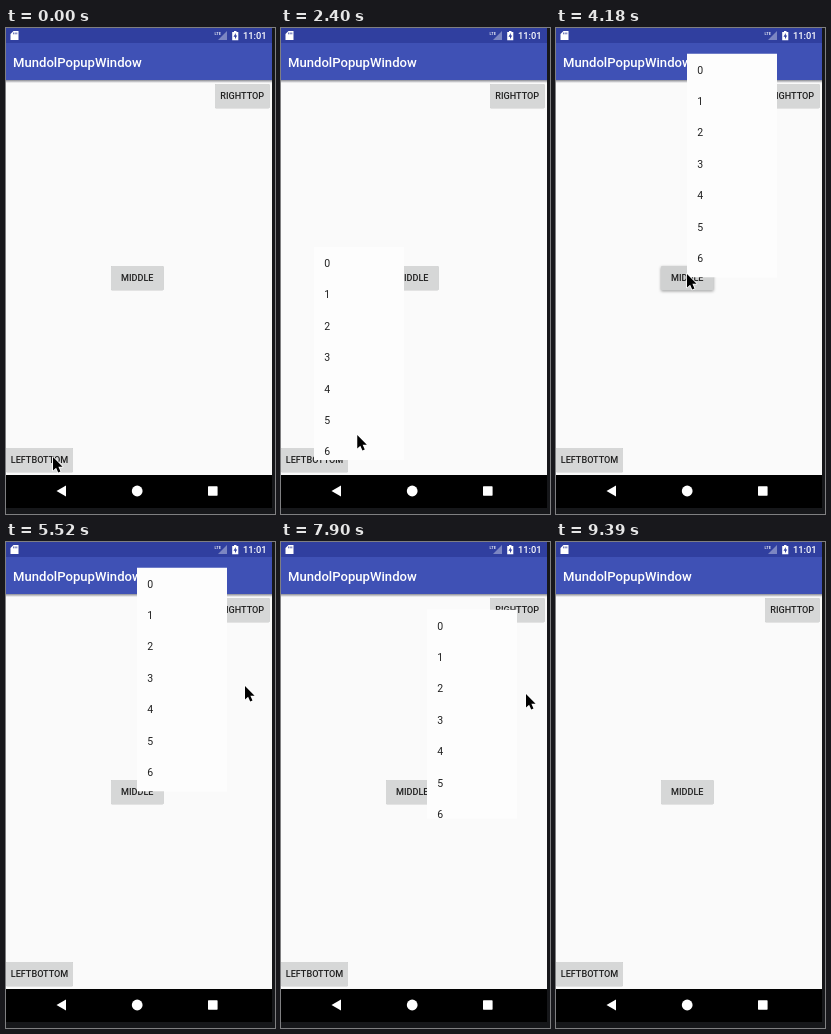
Animation of 269x486 px, one loop 9840 ms. Source, as an HTML page:

```html
<!DOCTYPE html>
<html lang="en">
<head>
<meta charset="utf-8">
<title>Popup window demo</title>
<style>
  html, body { margin: 0; width: 100%; height: 100%; overflow: hidden; background: #16171a; }
  svg { display: block; font-family: Roboto, "Noto Sans", sans-serif; }
  .button { font-size: 9.1px; font-weight: 500; text-anchor: middle; }
  .popup { font-size: 10.5px; text-anchor: middle; }
  text { fill: #212121; }
  .bar { fill: #fff; font-weight: 500; }
</style>
</head>
<body>
<svg id="stage" width="269" height="486" viewBox="0 0 269 486">
  <defs>
    <linearGradient id="fade" x2="0" y2="1">
      <stop stop-color="#8b8c94"/>
      <stop offset="1" stop-color="#fafafa"/>
    </linearGradient>
    <clipPath id="screen"><path d="M0 0H266V447H0Z"/></clipPath>
  </defs>

  <g clip-path="url(#screen)">
    <path fill="#fafafa" d="M0 52H266V447H0Z"/>
    <path fill="url(#fade)" d="M0 52H266V55H0Z"/>
    <path fill="#3f51b5" d="M0 15H266V52H0Z"/>
    <path fill="#303f9f" d="M0 0H266V15H0Z"/>
    <text class="bar" x="7" y="38.5" font-size="13.1">MundolPopupWindow</text>
    <text class="bar" x="237" y="11.2" font-size="9.3">11:01</text>

    <!-- status icons -->
    <path fill="#fff" d="M7.5 3H12.5V12H4.5V6Z"/>
    <path stroke="#303f9f" stroke-width=".8" d="M7.6 4.5V6.3M9.2 4.5V6.3M10.8 4.5V6.3"/>
    <path fill="#7c86c2" d="M221 3V12H212Z"/>
    <text class="bar" x="208.5" y="6.5" font-size="4">LTE</text>
    <path fill="#fff" d="M228 3H230.5V4H232.3V12.3H226.2V4H228Z"/>
    <path fill="#303f9f" d="M229.8 5 227.5 8.7H229V11.3L231.2 7.6H229.8Z"/>

    <g id="buttons"></g>
    <g id="popups"></g>
  </g>

  <path d="M0 447H266V480H0Z"/>
  <g fill="#fff">
    <path d="M50.5 463 60 457.6V468.4Z"/>
    <circle cx="131.2" cy="463" r="5.4"/>
    <rect x="202" y="458.3" width="9.6" height="9.4" rx=".6"/>
  </g>

  <path id="cursor" d="M1 1V14.5L4.1 11.7 6.2 16.4 8.5 15.4 6.4 10.8H10.6Z"
    stroke="#fff" stroke-width="1.6" stroke-linejoin="round" paint-order="stroke"/>
</svg>

<script>
const LOOP = 9840, ROW = 31.4;
const $ = id => document.getElementById(id);

// Each popup hangs from the centre of its button.
const items = [
  { label: 'LEFTBOTTOM', x: 0, y: 420, w: 67, popup: [33, 219, 213],
    press: 1650, raised: 1800, open: 1950, release: 2250, close: 3140 },
  { label: 'MIDDLE', x: 105, y: 238, w: 52.5, popup: [131, 25.5, 224],
    press: 4180, raised: 4180, open: 4180, release: 4480, close: 5820 },
  { label: 'RIGHTTOP', x: 209, y: 56, w: 54.5, popup: [146, 67.5, 209],
    press: 6850, raised: 6850, open: 7150, release: 7450, close: 8200 }
];

// Cursor moves: start, last step, number of steps, destination.
const home = [46, 428];
const moves = [
  [2400, 2840, 4, 163, 340],
  [3440, 3890, 4, 130, 245],
  [4630, 5080, 4, 215, 189],
  [5230, 5520, 3, 238, 143],
  [6260, 6700, 4, 236, 62],
  [7750, 7900, 2, 244, 151],
  [8050, 8650, 5, 238, 326],
  [9090, 9240, 2, 203, 462]
];
const cursorGone = 9390;

function add(parent, markup) {
  parent.insertAdjacentHTML('beforeend', markup);
  return parent.lastElementChild;
}

items.forEach((item, i) => {
  const { label, x, y, w, popup: [px, py, h] } = item;
  item.button = add($('buttons'), `<g class="button">
    <rect x="${x}" y="${y}" width="${w}" height="24.3" rx="1"/>
    <text x="${x + w / 2}" y="${y + 15.3}">${label}</text></g>`);
  const rows = [...Array(7).keys()].map(n =>
    `<text x="${px + 13.3}" y="${py + 20 + n * ROW}">${n}</text>`).join('');
  item.list = add($('popups'), `<g class="popup" clip-path="url(#clip${i})">
    <clipPath id="clip${i}"><rect x="${px}" y="${py}" width="90" height="${h}"/></clipPath>
    <rect x="${px}" y="${py}" width="90" height="${h}" fill="#fdfdfd"/>${rows}</g>`);
});

function cursorAt(t) {
  let [x, y] = home;
  for (const [start, end, steps, toX, toY] of moves) {
    if (t < start) break;
    const step = Math.floor((t - start) / (end - start) * (steps - 1) + 1e-6) + 1;
    const p = Math.min(1, step / steps);
    x += (toX - x) * p;
    y += (toY - y) * p;
  }
  return [x, y];
}

function draw(now) {
  const t = now % LOOP;
  for (const item of items) {
    const held = t >= item.press && t < item.release;
    const lift = !held ? 0 : t < item.raised ? .4 : 1;
    const box = item.button.firstElementChild;
    box.setAttribute('fill', lift === 1 ? '#d0d1d1' : '#d6d7d7');
    box.style.filter =
      `drop-shadow(0 ${.7 + lift}px ${.7 + lift}px rgba(0,0,0,${.3 + lift * .08}))`;
    item.list.style.display = t >= item.open && t < item.close ? '' : 'none';
  }
  $('cursor').setAttribute('transform', `translate(${cursorAt(t)})`);
  $('cursor').style.display = t < cursorGone ? '' : 'none';
}

function tick() {
  draw(performance.now());
  requestAnimationFrame(tick);
}
tick();
</script>
</body>
</html>
```
